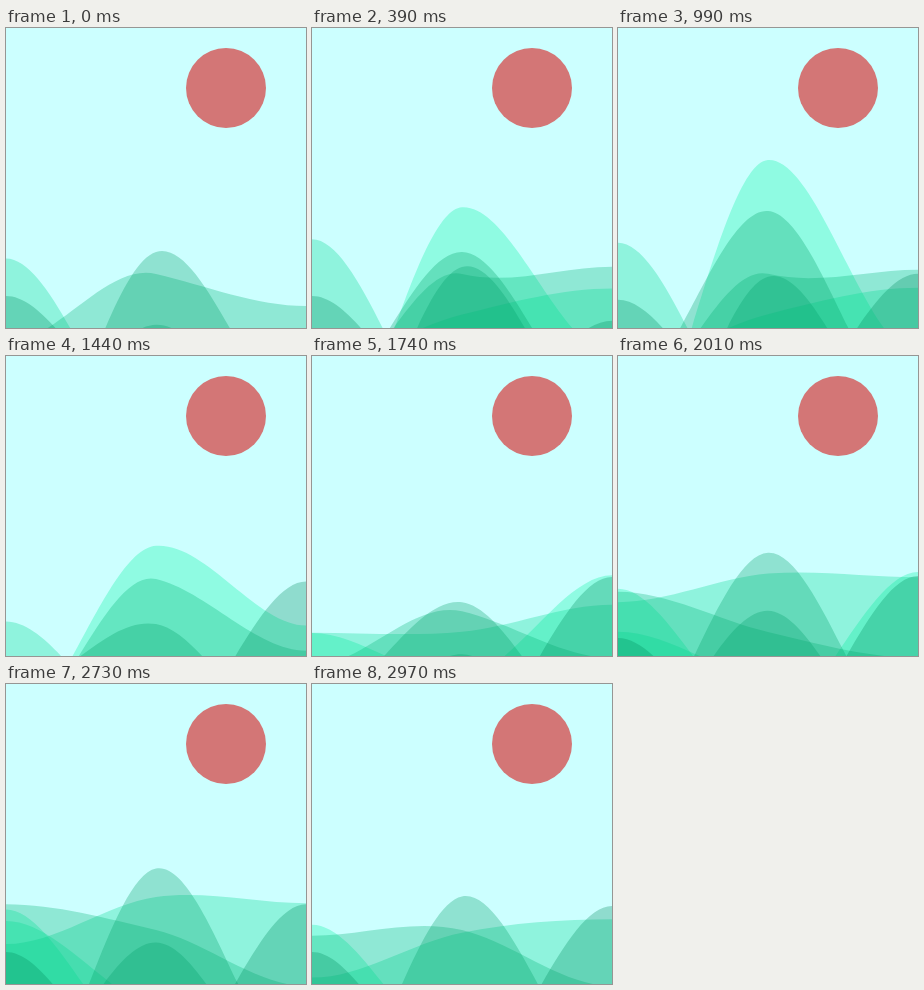
An HTML page with a canvas for the animation above (3000 ms loop, 300 by 300 pixels).

```html
<!DOCTYPE html>
<html lang="en">
<head>
<meta charset="utf-8">
<title>Rolling hills</title>
<style>
  html, body { margin: 0; width: 100%; height: 100%; overflow: hidden; background: #cff; }
  canvas { display: block; }
</style>
</head>
<body>
<canvas id="stage" width="300" height="300"></canvas>
<script>
const ctx = document.getElementById('stage').getContext('2d');
const SIZE = 300, LOOP = 3000, STEP = 30;

// A height that rests at `rest` and swells by `rise` pixels around second `at`.
const swell = (rest, ...bumps) => t => bumps.reduce(
  (y, [rise, at, spread]) => y - rise * Math.exp(-(((t - at) / spread) ** 4)), rest);

// Each hill joins its left, middle and right heights; slope applies at the middle.
const hills = [
  {
    green: 242, slope: -10,
    left: swell(460, [236, 2.45, 1]),
    mid: swell(366, [234, .9, .74]),
    right: swell(326, [110, 2, .62])
  },
  {
    green: 235,
    left: swell(335, [108, 2.45, .5]),
    mid: swell(325, [40, .7, .7]),
    right: swell(330, [72, .7, .72])
  },
  {
    green: 215,
    left: swell(300, [89, .6, .85], [58, 2.3, .55]),
    mid: swell(430, [222, 2.4, .85]),
    right: swell(400, [183, 2.4, 1])
  },
  {
    green: 178, slope: 35,
    left: swell(385, [70, 0, .3], [168, 2.45, .75]),
    mid: swell(246, [23, 1.44, .3], [-30, 2.08, .4]),
    right: swell(302, [65, .65, .65])
  },
  {
    green: 160,
    left: swell(408, [-95, .7, .6]),
    mid: swell(325, [88, .62, .6], [78, 2.35, .6]),
    right: swell(415)
  },
  {
    green: 158,
    left: swell(380, [-105, 0, .3], [42, 1.44, .4], [-70, 2.8, .8]),
    mid: swell(224, [41, .95, .35], [-45, 1.47, .3], [45, 2.43, .5]),
    right: swell(392)
  },
  {
    green: 140,
    left: swell(268, [-42, 1.55, .45]),
    mid: swell(400),
    right: swell(316, [96, 2.3, 1.75])
  }
];

function drawHill(h, t) {
  const a = h.left(t), b = h.mid(t), c = h.right(t);
  const lift = (h.slope ?? (c - a) / 2) / 3;
  ctx.fillStyle = `rgba(0, ${h.green}, ${Math.round(h.green * .66)}, .3)`;
  ctx.beginPath();
  ctx.moveTo(0, a);
  ctx.bezierCurveTo(50, a, 100, b - lift, 150, b);
  ctx.bezierCurveTo(200, b + lift, 250, c, 300, c);
  ctx.lineTo(300, 600);
  ctx.lineTo(0, 600);
  ctx.fill();
}

function draw(now) {
  const t = Math.floor((now % LOOP) / STEP) * STEP / 1000;
  ctx.fillStyle = '#cff';
  ctx.fillRect(0, 0, SIZE, SIZE);
  ctx.fillStyle = 'rgb(211, 118, 118)';
  ctx.beginPath();
  ctx.arc(220, 60, 40, 0, Math.PI * 2);
  ctx.fill();
  hills.forEach(h => drawHill(h, t));
}

function tick() {
  draw(performance.now());
  requestAnimationFrame(tick);
}
tick();
</script>
</body>
</html>
```
